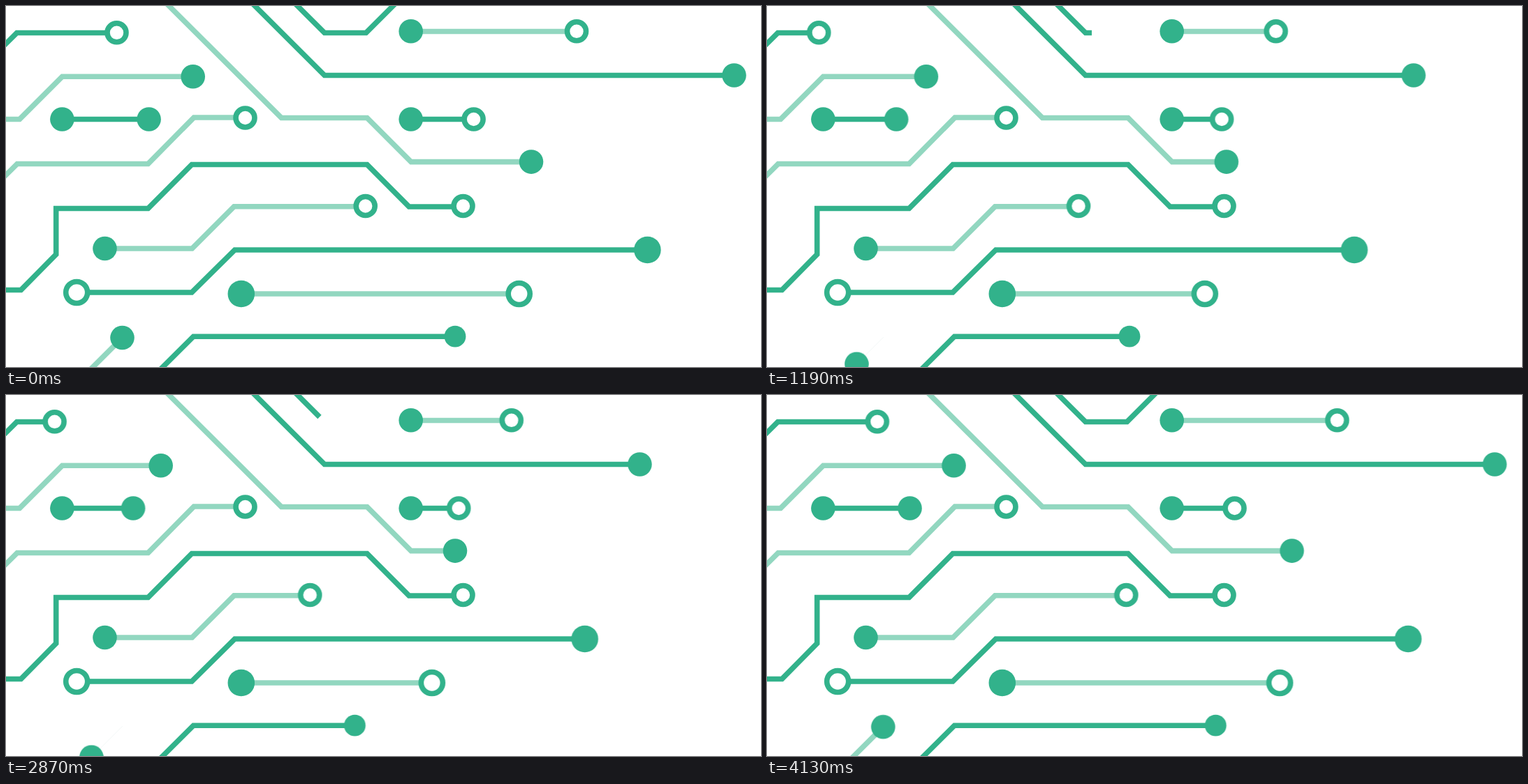
Animation, 1081 px wide and 518 px high, one loop 4200 ms. Source, as an HTML page:

```html
<!DOCTYPE html>
<html lang="en">
<head>
<meta charset="utf-8">
<title>Circuit traces</title>
<style>
  html, body { margin: 0; width: 100%; height: 100%; overflow: hidden; background: #fff; }
  svg { display: block; width: 100%; height: 100%; }
  svg { --dark: #32b28b; --light: #92d7c0; }
  path { fill: none; stroke: var(--dark); stroke-width: 7.6; stroke-miterlimit: 10; }
  .light { stroke: var(--light); }
  .hair { stroke: #edf3f1; stroke-width: .6; }
  circle { fill: var(--dark); r: 17.3px; }
  .big { r: 19.3px; }
  .small { r: 15.4px; }
  .ring { fill: #fff; stroke: var(--dark); stroke-width: 7.6; r: 13.5px; }
  .ring.big { r: 15.5px; }

  /* Moving traces are drawn from their free end, so a leading gap of --d shortens them. */
  .run path, .hold path { stroke-dasharray: 0 300 3000 0; }
  .run path { animation: trim 4200ms infinite; }
  .run .node { animation: slide 4200ms infinite; }
  .hold path { animation: trim-hold 4200ms infinite; }
  .hold .node { animation: slide-hold 4200ms infinite; }
  .run path, .hold path, .node { animation-timing-function: cubic-bezier(.33333, 0, .66667, 1) !important; }

  @keyframes trim {
    0%, 100% { stroke-dashoffset: 300px; }
    50% { stroke-dashoffset: calc(300px - var(--d)); }
  }
  @keyframes slide {
    0%, 100% { transform: translate(0px, 0px); }
    50% { transform: translate(var(--x, calc(-1 * var(--d))), var(--y, 0px)); }
  }
  @keyframes trim-hold {
    0%, 100% { stroke-dashoffset: 300px; }
    33.3333%, 66.6667% { stroke-dashoffset: calc(300px - var(--d)); }
  }
  @keyframes slide-hold {
    0%, 100% { transform: translate(0px, 0px); }
    33.3333%, 66.6667% { transform: translate(calc(-1 * var(--d)), 0px); }
  }
</style>
</head>
<body>
<svg viewBox="0 0 1081 518">
  <!-- still traces -->
  <path class="light" d="M-8 250.5L16 226.5H203.5L269 160H342.5"/>
  <circle class="ring" cx="342.5" cy="160.5"/>
  <path d="M-8 407.5H21.5L71.7 356.5V290.5H203.5L266 227.5H517L577 288H654.5"/>
  <circle class="ring" cx="654.5" cy="287"/>

  <!-- traces that pause when short -->
  <g class="hold" style="--d:89.6px">
    <path d="M158.5 38.5H15.5L-8 62"/>
    <circle class="ring node" cx="158.5" cy="38.3"/>
  </g>
  <g class="hold" style="--d:94px">
    <path class="light" d="M817 36.5H580"/>
    <circle cx="579.7" cy="36.3"/>
    <circle class="ring node" cx="817" cy="36.3"/>
  </g>

  <!-- traces that shrink and grow without a pause -->
  <g class="run" style="--d:200.7px">
    <path d="M564.9 -11L515.5 38.5H456L401 -16.5"/>
  </g>
  <g class="run" style="--d:194.5px">
    <path d="M1042.5 99.5H456L346 -10.5"/>
    <circle class="node" cx="1042.5" cy="99.5"/>
  </g>
  <g class="run" style="--d:66.3px">
    <path class="light" d="M267.7 101.2H80.5L19.5 162.5H-8"/>
    <circle class="node" cx="267.7" cy="101.3"/>
  </g>
  <g class="run" style="--d:32.4px">
    <path d="M204.6 162.5H80.5"/>
    <circle cx="80.4" cy="162.5"/>
    <circle class="node" cx="204.6" cy="162.5"/>
  </g>
  <g class="run" style="--d:30.8px">
    <path d="M669.6 162.5H580"/>
    <circle cx="579.7" cy="162.5"/>
    <circle class="ring node" cx="669.6" cy="162.5"/>
  </g>
  <g class="run" style="--d:157px">
    <path class="light" d="M752 223.6H580L517 160.5H394.3L223.5 -10"/>
    <circle class="node" cx="752" cy="223.6"/>
  </g>
  <g class="run" style="--d:114.4px">
    <path class="light" d="M514.7 287.8H326.5L266.5 348H141.5"/>
    <circle cx="141.5" cy="348"/>
    <circle class="ring node" cx="514.7" cy="287"/>
  </g>
  <g class="run" style="--d:129.2px">
    <path d="M918.4 350H327.5L266 411H101"/>
    <circle class="ring big" cx="101.2" cy="411"/>
    <circle class="big node" cx="918.4" cy="350"/>
  </g>
  <g class="run" style="--d:179.7px">
    <path class="light" d="M734.7 413H337"/>
    <circle class="big" cx="336.8" cy="413"/>
    <circle class="ring big node" cx="734.7" cy="413"/>
  </g>
  <g class="run" style="--d:206.7px">
    <path d="M643 474.2H268.3L214 528.5"/>
    <circle class="small node" cx="643" cy="474.2"/>
  </g>
  <path class="hair" d="M167 475L122 520"/>
  <g class="run" style="--d:89.4px; --x:-63.6px; --y:62.8px">
    <path class="light" d="M166.5 476L114 528.5"/>
    <circle class="node" cx="166.5" cy="476"/>
  </g>
</svg>
</body>
</html>
```
